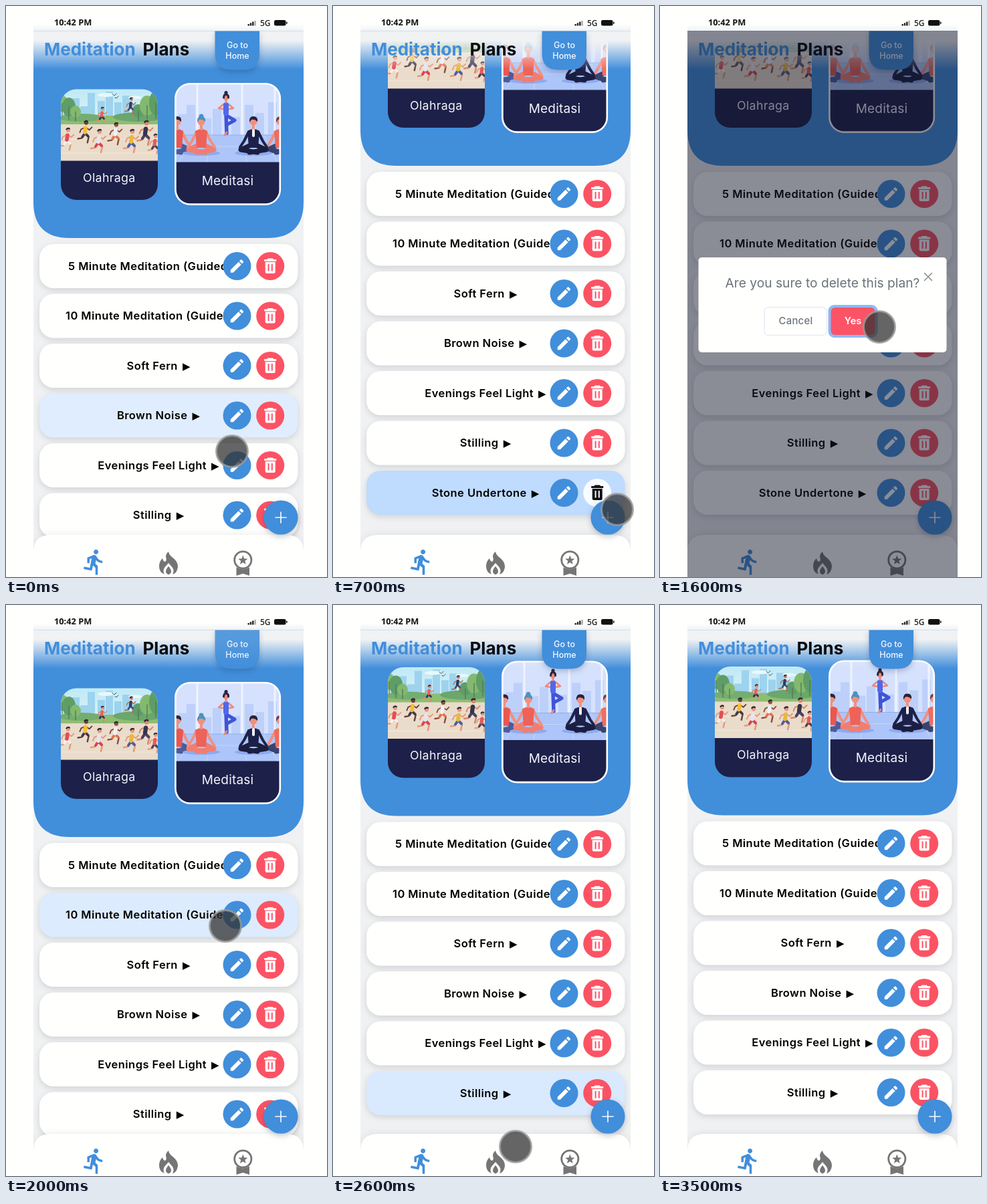
Write an HTML page that moves like this. It is 480 px wide and 854 px high and loops after 3.6 s.

```html
<!DOCTYPE html>
<html lang="en">
<head>
<meta charset="utf-8">
<title>Meditation Plans</title>
<style>
  html, body { margin: 0; width: 100%; height: 100%; overflow: hidden; background: #fffffe; }
  svg { display: block; width: 480px; height: 854px; font-family: Inter, "Noto Sans", sans-serif; }
  .row-box { filter: drop-shadow(0 3px 4px rgba(30, 35, 50, .15)); }
  .name { font-weight: 600; font-size: 16.5px; letter-spacing: .45px; }
  .play { font: 15px "DejaVu Sans", sans-serif; letter-spacing: 0; }
  .lift { filter: drop-shadow(0 3px 4px rgba(20, 30, 60, .25)); }
  .nav { filter: drop-shadow(0 -2px 5px rgba(30, 35, 50, .07)); }
  .mid { text-anchor: middle; }
</style>
</head>
<body>
<svg id="stage" viewBox="0 0 480 854"></svg>
<script>
const LOOP = 3600, STEP = 100;
const BLUE = '#418edb', RED = '#fb5364', NAVY = '#1d2049', GRAY = '#757575';
const ROW_GAP = 74.5;
const names = ['5 Minute Meditation (Guided)', '10 Minute Meditation (Guided)', 'Soft Fern',
  'Brown Noise', 'Evenings Feel Light', 'Stilling', 'Stone Undertone'];
const LAST = names.length - 1;

// Tracks: [time, value, ...]
const scroll = [[0, 0], [200, 0], [300, 40], [400, 80], [500, 102], [600, 108], [1899, 108], [1900, 0],
  [2200, 0], [2300, 8], [2400, 20], [2500, 28], [2600, 31.5], [2700, 32.5]];
const pointer = [[0, 338, 666], [200, 350, 680], [600, 425, 753], [1000, 425, 753], [1400, 332, 484],
  [1500, 328, 480], [2000, 328, 480], [2300, 320, 570], [2600, 273, 810], [2800, 264, 712]];
const dialog = [[800, 0], [900, .4], [1000, .8], [1100, 1], [1700, 1], [1800, .5], [1900, 0]];
const tabFade = [[1800, 1], [1900, .8], [2000, .88], [2100, 1]];
const hover = {
  1: [[1800, 0], [2000, .55], [2100, .55], [2300, 0]],
  2: [[2100, 0], [2200, .4], [2400, 0]],
  3: [[0, .5], [200, 0], [2200, 0], [2300, .4], [2500, 0]],
  4: [[100, 0], [200, .4], [400, 0], [2300, 0], [2400, .4], [2600, 0], [2700, 0], [2800, .6], [3000, .08], [3100, 0]],
  5: [[300, 0], [400, .4], [600, 0], [2400, 0], [2500, .6], [2600, .6], [2800, 0]],
  6: [[400, 0], [600, .7], [700, 1], [900, 1], [1200, 0]]
};

function at(track, t) {
  let i = track.findIndex(k => k[0] > t);
  if (i < 0) return track[track.length - 1].slice(1);
  if (i === 0) return track[0].slice(1);
  const a = track[i - 1], b = track[i], p = (t - a[0]) / (b[0] - a[0]);
  return a.slice(1).map((v, n) => v + (b[n + 1] - v) * p);
}

const rect = (x, y, w, h, fill, r = 0, more = '') =>
  `<rect x="${x}" y="${y}" width="${w}" height="${h}" rx="${r}" fill="${fill}" ${more}/>`;
const disc = (x, y, r, fill, more = '') => `<circle cx="${x}" cy="${y}" r="${r}" fill="${fill}" ${more}/>`;
const blob = (x, y, rx, ry, fill) => `<ellipse cx="${x}" cy="${y}" rx="${rx}" ry="${ry}" fill="${fill}"/>`;
const line = (d, color, w) =>
  `<path d="${d}" fill="none" stroke="${color}" stroke-width="${w}" stroke-linecap="round" stroke-linejoin="round"/>`;
const label = (x, y, size, fill, text, more = 'class="mid"') =>
  `<text x="${x}" y="${y}" font-size="${size}" fill="${fill}" ${more}>${text}</text>`;

function runner(x, y, shirt, pants, skin, k = 1) {
  return `<g transform="translate(${x} ${y}) scale(${k})">` +
    line('M0 1L-5 8L-11 9M0 1L6 6L4 15', skin, 2.6) + line('M0 0L-4 6M0 0L5 5', pants, 4) +
    line('M1 -9L-6 -6L-8 -1M1 -9L7 -5L11 -9', skin, 2) + line('M1 -8L0 -1', shirt, 6) +
    disc(2, -16, 3.2, skin) + line('M-.5 -17.5Q1.5 -20 4 -18.5', '#2c2636', 2.4) + '</g>';
}

function sitter(x, top, legs, hair, sleeve = '#f0907f') {
  return `<g transform="translate(${x} 0)">` +
    line('M-6 209L-19 215L6 219M6 209L19 215L-6 219', legs, 7) +
    line('M-7 188L-14 202L-20 211M7 188L14 202L20 211', sleeve, 4) +
    `<path d="M-9 187Q0 181 9 187L7 212H-7Z" fill="${top}"/>` +
    line('M0 177V184', '#f0907f', 4) + disc(0, 173, 5.5, '#f0907f') +
    `<path d="M-6 174Q-7 165 0 165Q7 165 6 173Q2 169 -3 170Z" fill="${hair}"/></g>`;
}

function sportArt() {
  const towers = [[86, 24], [99, 34], [111, 22], [122, 42], [137, 30], [149, 44], [162, 28], [174, 38], [188, 25]];
  const trees = [[84, 146, 9, 12], [94, 151, 10, 14], [104, 158, 8, 9], [198, 157, 9, 10], [211, 149, 11, 15], [224, 145, 10, 18]];
  const people = [
    [143, 165, '#f05d4e', '#333655', '#d98b6a', .7], [186, 151, '#343a5c', '#42557d', '#b9704f', .72],
    [91, 201, '#e64d52', '#f4f1ee', '#e69a7a', .95], [118, 190, '#f3bd38', '#3f3a4d', '#6b4033', .95],
    [138, 204, '#e8e4ef', '#d84452', '#e69a7a', 1], [163, 193, '#f0f0f5', '#e2734d', '#8a503c', .95],
    [187, 204, '#e9b83d', '#4d5ea0', '#e69a7a', 1], [208, 192, '#36344c', '#4c4361', '#d98b6a', 1.05],
    [222, 208, '#e45a59', '#514258', '#e69a7a', .85]];
  return rect(82, 124, 145, 60, 'url(#sky)') +
    towers.map(([x, h]) => rect(x, 172 - h, 11, h, '#9dd3ee')).join('') +
    blob(150, 133, 13, 3, '#e9f8fc') + blob(193, 137, 10, 2.5, '#e9f8fc') +
    line('M159 132l3 2l3 -3M163 137l2 1l3 -3', '#3d5068', 1) +
    rect(82, 164, 145, 18, '#8fbd72') + blob(112, 167, 34, 6, '#74ad70') + blob(198, 166, 38, 7, '#6ba66c') +
    trees.map(([x, y, a, b], i) => blob(x, y, a, b, i % 2 ? '#5f9d67' : '#83b96f') +
      line(`M${x} ${y}V${y + b + 5}`, '#547a58', 1.4)).join('') +
    rect(82, 177, 145, 56, '#eadccb') + line('M82 199H227M82 220H227', '#f3e9dd', 1.2) +
    people.map(p => runner(...p)).join('');
}

function calmArt() {
  const towers = [[258, 32], [270, 46], [294, 26], [309, 40], [337, 28], [357, 46], [373, 34], [392, 50]];
  return rect(253, 115, 157, 120, '#d5e1fd') +
    towers.map(([x, h]) => rect(x, 194 - h, 13, h, '#bdd0fa')).join('') +
    line('M286 116V194M353 116V194M402 116V194', '#eef3ff', 3) +
    rect(253, 193, 157, 42, '#adc5f8') + line('M253 193H410', '#8eafee', 1.2) +
    line('M280 194L258 234M306 194L300 234M354 194L360 234M386 194L406 234M253 210H410', '#c4d6fb', 1) +
    sitter(256, '#e9574f', '#4d5b9a', '#2b2540') + sitter(410, '#f06c5e', '#39436f', '#6c3e43') +
    line('M329 163L330 190', '#4054d8', 5.5) + line('M330 164L342 171L331 177', '#4054d8', 5) +
    line('M330 189L327 193', '#e98b78', 3) + line('M325 147L318 153L329 155L340 153L333 147', '#e98b78', 2.6) +
    line('M329 148V160', '#5167ec', 8) + line('M329 139V144', '#e98b78', 3) + disc(329, 137, 4.2, '#e98b78') +
    line('M325.5 137Q326 132 329 132Q333 133 332.5 137', '#2b2540', 3) + disc(329, 129.5, 2.6, '#2b2540') +
    blob(292, 220, 28, 4, '#8eaaf0') + blob(370, 220, 28, 4, '#8eaaf0') +
    disc(292, 165, 3.5, '#4b93bd') + sitter(292, '#ee6258', '#f07e70', '#4b93bd') +
    sitter(370, '#1d2149', '#1b1e3f', '#27223a', '#1d2149') +
    line('M370 186V194', '#f6f7ff', 4);
}

const pencil = 'M3 17.25V21h3.75L17.81 9.94l-3.75-3.75ZM20.71 7.04c.39-.39.39-1.02 0-1.41l-2.34-2.34c-.39-.39-1.02-.39-1.41 0l-1.83 1.83 3.75 3.75Z';
const bin = 'M-9 -10H-5L-3.500 -11.500H3.500L5 -10H9V-7H-9ZM-7.500 -6H7.500V8.500Q7.500 11 5 11H-5Q-7.500 11 -7.500 8.500ZM-3.600 -3V7.500H-1.600V-3ZM1.600 -3V7.500H3.600V-3Z';
const jogger = 'M13.49 5.48c1.1 0 2-.9 2-2s-.9-2-2-2-2 .9-2 2 .9 2 2 2zm-3.6 13.9l1-4.4 2.1 2v6h2v-7.5l-2.1-2 .6-3c1.3 1.5 3.3 2.5 5.5 2.5v-2c-1.9 0-3.5-1-4.3-2.4l-1-1.6c-.4-.6-1-1-1.7-1-.3 0-.5.1-.8.1l-5.2 2.2v4.7h2v-3.4l1.8-.7-1.6 8.1-4.9-1-.4 2z';

function row(name, i) {
  const long = i < 2;
  const place = long ? `x="${[93, 89][i]}"` : 'x="228" text-anchor="middle"';
  const play = long ? '' : '<tspan class="play" dx="7">▶</tspan>';
  return `<g class="row" transform="translate(0 ${389 + i * ROW_GAP})">` +
    rect(50, -33, 386.5, 66, '#fffffe', 21, 'class="row-box"') +
    `<text class="name" ${place} y="5.5">${name}${play}</text>` +
    disc(345.5, 0, 21, BLUE) + `<path d="${pencil}" transform="translate(332.500 -13) scale(1.08)" fill="#fff"/>` +
    disc(395.2, 0, 21, RED, 'class="bin-disc"') +
    `<path class="bin" d="${bin}" transform="translate(395.200 0)" fill="#fff" fill-rule="evenodd"/></g>`;
}

function star(x, y, r) {
  const pts = [...Array(10)].map((_, i) => {
    const a = i * Math.PI / 5 - Math.PI / 2, d = i % 2 ? r * .42 : r;
    return `${x + d * Math.cos(a)},${y + d * Math.sin(a)}`;
  });
  return `<polygon points="${pts.join(' ')}" fill="${GRAY}"/>`;
}

const fade = (id, a, b, c) => `<linearGradient id="${id}" x2="0" y2="1"><stop stop-color="${a}"/>` +
  `<stop offset="${c}" stop-color="${a}"/><stop offset="1" stop-color="${b}"/></linearGradient>`;
const clip = (id, shape) => `<clipPath id="${id}">${shape}</clipPath>`;

const hero =
  '<path d="M41 37H445V293Q445 347 391 347H95Q41 347 41 293Z" fill="#418edb"/>' +
  `<g clip-path="url(#cardA)">${sportArt()}${rect(82, 231.5, 145, 60, NAVY)}</g>` +
  label(154.3, 262.5, 17.8, '#f4f5fb', 'Olahraga', 'class="mid" letter-spacing=".3"') +
  `<g clip-path="url(#cardB)">${calmArt()}${rect(253, 233.5, 157, 64, NAVY)}</g>` +
  rect(253.4, 116.2, 156.4, 180.4, 'none', 22, 'stroke="#fff" stroke-width="2.6"') +
  label(331.5, 267.5, 19, '#f4f5fb', 'Meditasi', 'class="mid" letter-spacing=".2"');

const header = rect(41, 37, 404, 58, 'url(#veil)') +
  line('M41 37.500H445', '#d3dfec', 1) +
  label(57, 74, 26, BLUE, 'Meditation', 'font-weight="700"') +
  label(204.5, 74, 26, '#0b0b0d', 'Plans', 'font-weight="700"') +
  '<g id="tab"><path class="lift" d="M312.500 37.500H379V71Q379 95.500 355 95.500H337Q312.500 95.500 312.500 71Z" fill="#418edb"/>' +
  label(346, 62.5, 12.5, '#f6faff', 'Go to', 'class="mid" font-weight="500"') +
  label(346, 79, 12.5, '#f6faff', 'Home', 'class="mid" font-weight="500"') + '</g>';

const nav = '<path class="nav" d="M41 854V817Q41 791 67 791H419Q445 791 445 817V854Z" fill="#fffffe"/>' +
  `<path d="${jogger}" transform="translate(111 810.500) scale(1.75)" fill="${BLUE}"/>` +
  `<path d="M243 816C244 825 257 826 257 839Q256 848 249 850Q252 845 249 840L243 833L237 840Q234 845 237 850Q229 847 229 838Q229 831 234 826Q235 831 238 831Q241 829 239 824Q239 819 243 816Z" fill="${GRAY}"/>` +
  `<path d="M243 838Q251 847 243 850.500Q235 847 243 838Z" fill="${GRAY}"/>` +
  disc(354.3, 828.5, 12.6, 'none', `stroke="${GRAY}" stroke-width="2.8"`) + star(354.3, 829, 7.5) +
  `<path d="M344.500 839.500Q354 845 364 839.500V852L354.300 849L344.500 852Z" fill="${GRAY}"/>`;

const fab = disc(411, 765, 25.6, BLUE, 'class="lift"') + line('M403 765H419M411 757V773', '#f5f9ff', 1.7);

const modal = rect(41, 37, 404, 817, '#12162a', 0, 'id="shade"') +
  '<g id="modal">' + rect(57.5, 376, 371, 142, '#fffffe', 5) +
  label(243, 421, 19.2, '#6b727a', 'Are you sure to delete this plan?') +
  line('M395.500 399.500L406.500 410.500M406.500 399.500L395.500 410.500', '#858b93', 1.5) +
  rect(156, 450.5, 93, 42, '#fffffe', 6, 'stroke="#e9ecf1" stroke-width="1.4"') +
  label(203, 476, 14.8, '#6c737c', 'Cancel', 'class="mid" font-weight="500" letter-spacing=".3"') +
  rect(251.5, 447, 74, 49, '#8ebaf6', 9, 'id="ring"') + rect(255.5, 451, 66, 41, '#fc5466', 6) +
  label(288.5, 476, 14.5, '#fff', 'Yes', 'class="mid" font-weight="600"') + '</g>';

const status = rect(0, 0, 480, 37, '#fffffe') + rect(41, 27, 404, 10, 'url(#edge)') +
  label(72, 29, 12.8, '#111', '10:42 PM', 'font-weight="700" font-family="Open Sans, sans-serif"') +
  [0, 1, 2, 3].map(i => rect(361.5 + i * 3.3, 27 - i * 1.7, 2.4, 2.5 + i * 1.7, i < 3 ? '#222' : '#aaa', .6)).join('') +
  label(380, 30, 12, '#222', '5G', 'font-weight="600" font-family="Open Sans, sans-serif"') +
  rect(401, 21, 17.5, 8.6, '#111', 2.5) + rect(419, 23.5, 1.7, 3.5, '#333', .8);

const stage = document.getElementById('stage');
stage.innerHTML = '<defs>' + fade('sky', '#c2eaf6', '#e6f7f6', .1) + fade('veil', '#f0f2f4', 'rgba(240,242,244,0)', .25) +
  fade('edge', 'rgba(240,242,244,0)', '#f0f2f4', 0) +
  clip('cardA', rect(82, 124.5, 145, 165.5, '#000', 23)) + clip('cardB', rect(253, 116, 157, 181, '#000', 22)) +
  clip('phone', rect(41, 37, 404, 817, '#000')) + '</defs>' +
  rect(0, 0, 480, 854, '#fffffe') +
  `<g clip-path="url(#phone)">${rect(41, 37, 404, 817, '#f0f1f2')}<g id="page">${hero}${names.map(row).join('')}</g>` +
  header + nav + fab + modal + '</g>' + status +
  disc(0, 0, 23.5, 'rgba(50,50,50,.75)', 'id="pointer" stroke="rgba(155,155,155,.8)" stroke-width="3"');

const $ = id => document.getElementById(id);
const rows = [...document.querySelectorAll('.row')];
const boxes = rows.map(r => r.querySelector('.row-box'));
const lastDisc = rows[LAST].querySelector('.bin-disc'), lastBin = rows[LAST].querySelector('.bin');
const tint = p => `rgb(${[[255, 191], [255, 219], [254, 254]].map(([a, b]) => Math.round(a + (b - a) * p))})`;
const move = (el, x, y) => el.setAttribute('transform', `translate(${x} ${y})`);

function render(t) {
  move($('page'), 0, -at(scroll, t)[0]);
  boxes.forEach((b, i) => b.setAttribute('fill', tint(hover[i] ? at(hover[i], t)[0] : 0)));
  rows[LAST].style.display = t < 1900 ? '' : 'none';
  const pressed = t >= 600 && t < 900;
  lastDisc.setAttribute('fill', pressed ? '#f8fbff' : RED);
  lastBin.setAttribute('fill', pressed ? '#101014' : '#fff');
  $('tab').style.opacity = at(tabFade, t)[0];

  const open = at(dialog, t)[0];
  $('shade').style.opacity = open * .49;
  $('modal').style.opacity = open;
  move($('modal'), 0, -30 * (1 - open));
  $('ring').style.opacity = t >= 1500 ? 1 : 0;

  move($('pointer'), ...at(pointer, t));
  $('pointer').style.opacity = t < 2900 ? 1 : 0;
}

const start = performance.now();
function tick() {
  const t = (performance.now() - start) % LOOP;
  render(Math.floor(t / STEP) * STEP);
  requestAnimationFrame(tick);
}
tick();
</script>
</body>
</html>
```
